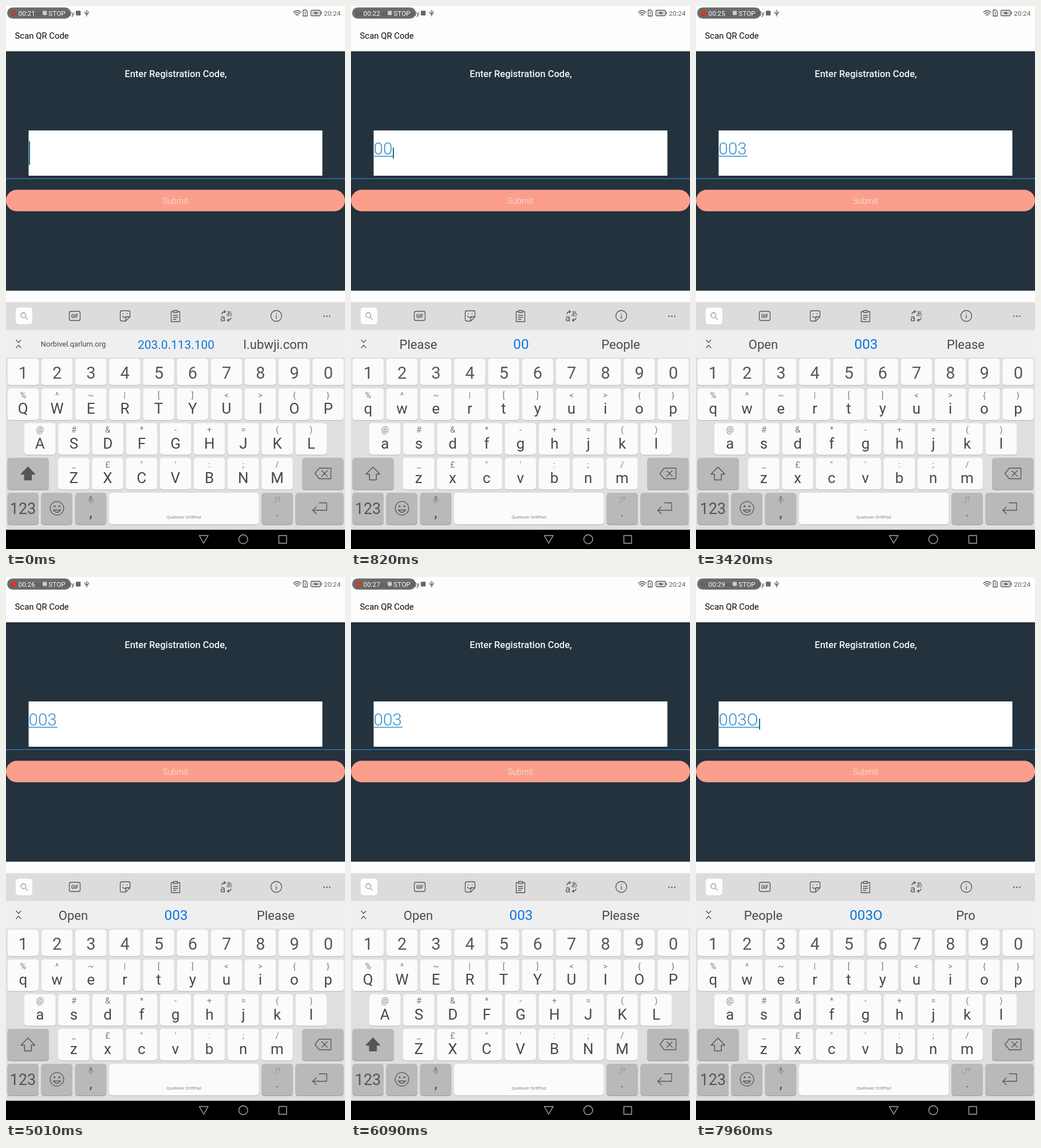
Write an HTML page that moves like this. It is 592x947 px and loops after 8000 ms.

```html
<!DOCTYPE html>
<html lang="en">
<head>
<meta charset="utf-8">
<title>Registration code entry</title>
<style>
  html, body { margin: 0; width: 100%; height: 100%; overflow: hidden; background: #fff; }
  svg { display: block; width: 100%; height: 100%; font-family: Roboto, sans-serif; }
  .mid { text-anchor: middle; }
  .line { fill: none; stroke: #555; stroke-width: 1.3; stroke-linecap: round; stroke-linejoin: round; }
  .key { fill: #fbfbfb; }
  .key-edge { fill: #c0c0c0; }
  .mod { fill: #b9b9b9; }
  .mod-edge { fill: #9c9c9c; }
  .num { font-size: 29px; fill: #585858; }
  .letter { font-size: 26px; fill: #484848; }
  .hint { font-size: 14.8px; fill: #7c7c7c; }
  .side { fill: #484848; }
  .best { fill: #0b76e0; }
  .small { font-size: 11.8px; }
</style>
</head>
<body>
<svg viewBox="0 0 592 947" preserveAspectRatio="none">
  <rect width="592" height="947" fill="#fdfdfd"/>

  <!-- status bar -->
  <g class="small">
    <text x="8" y="16.5" fill="#444">Emergency calls Only</text>
    <rect x="2" y="2.5" width="111" height="19.5" rx="9.7" fill="#565656" opacity=".87"/>
    <rect id="rec" x="9.5" y="8" width="8" height="8" rx="1.5" fill="#e8341c"/>
    <text id="clock" x="21.5" y="16.5" fill="#fff"></text>
    <rect x="64" y="8.5" width="7.3" height="7.3" rx="1" fill="#ccc"/>
    <text x="74.3" y="16.5" fill="#fff">STOP</text>
    <rect x="122" y="8.3" width="8.3" height="8.3" rx="1" fill="#666"/>
    <g class="line" stroke-width="1">
      <path d="M141 7.5v10M138 10v2.5l3 2.5M144 10v2l-3 2.5"/>
    </g>
    <g class="line">
      <path d="M502 11q6.500-6 13 0M504 13.500q4.500-4 9 0M506.500 16q2-2 4 0" />
      <path d="M519 7h4.500l2.500 2.500v8h-7zM522.500 10.500v3M522.500 15.500v.3"/>
      <rect x="532.500" y="7.500" width="16.500" height="9.500" rx="1.5"/>
      <path d="M551 10.500v3.500"/>
    </g>
    <rect x="534" y="9" width="13.5" height="6.500" fill="#d2d2d2"/>
    <path d="M536 12.700l5.500-2.700v1.800h4.500l-5.500 3v-2.100z" fill="#444"/>
    <text x="555" y="16.5" fill="#606060">20:24</text>
  </g>

  <!-- page -->
  <text x="15.500" y="57" font-size="14.9" fill="#0a0a0a">Scan QR Code</text>
  <rect y="79" width="592" height="417.5" fill="#23323d"/>
  <text class="mid" x="296.5" y="124" font-size="16.5" font-weight="500" fill="#f4f6f7">Enter Registration Code,</text>
  <rect x="39.500" y="217" width="513" height="79" fill="#fff"/>
  <rect y="300.500" width="592" height="1.2" fill="#3a83c4"/>
  <rect y="320.500" width="592" height="37.500" rx="18.75" fill="#fb9f8c"/>
  <text class="mid" x="296" y="345" font-size="14.2" font-weight="300" fill="#f5ebe8">Submit</text>
  <text id="value" x="39.500" y="258.500" font-size="29.6" font-weight="300" fill="#2f8fd2"></text>
  <rect id="under" x="40" y="261.300" height="1.5" fill="#2f8fd2"/>
  <rect id="cursor" width="2" fill="#15707c"/>

  <!-- keyboard -->
  <rect y="516.500" width="592" height="48.500" fill="#dcdcdc"/>
  <rect y="565" width="592" height="48" fill="#efefef"/>
  <rect y="613" width="592" height="301" fill="#dfdfdf"/>
  <rect x="17" y="526" width="29" height="29" rx="5" fill="#fdfdfd"/>
  <g class="line">
    <g stroke="#999"><circle cx="30.300" cy="539.300" r="4.300"/><path d="M33.600 542.600l4 4"/></g>
    <rect x="110.500" y="532.500" width="19" height="16" rx="3"/>
    <path d="M202 531.500h12a2.500 2.500 0 0 1 2.500 2.500v8l-7.500 7.500h-7a2.500 2.500 0 0 1-2.500-2.500v-13a2.500 2.500 0 0 1 2.500-2.500zM216.500 542h-5a2.500 2.500 0 0 0-2.500 2.500v5M203.500 541q3.500 4 7 .5M204.500 536.500v.6M211.500 536.500v.6"/>
    <path d="M292 533h-3.500v17.500h15v-17.500h-3.500M292.500 531h7v3.500h-7zM292 539.500h8M292 543h8M292 546.500h5"/>
    <path d="M377 537q1-4 6-4M381 531l2.500 2-2.500 2M393 544q-1 4-6 4M389 546l-2.500 2 2.500 2"/>
    <circle cx="472" cy="540.500" r="9.500"/>
    <path d="M472 539.500v5.500M472 535.800v.4"/>
    <path d="M18 582.500l4 4.500 4-4.500M18 596l4-4.500 4 4.500"/>
  </g>
  <text class="mid" x="120" y="543.700" font-size="8.300" font-weight="700" fill="#555">GIF</text>
  <text x="374" y="549.500" font-size="17" fill="#555">a</text>
  <text x="384" y="541" font-size="11.500" fill="#555" font-family="'Noto Sans CJK JP', 'Noto Sans CJK', sans-serif">あ</text>
  <g fill="#555"><circle cx="555.300" cy="541" r="1.2"/><circle cx="560.300" cy="541" r="1.2"/><circle cx="565.300" cy="541" r="1.2"/></g>

  <text id="left" class="mid side" x="117.500"></text>
  <text id="best" class="mid best" x="297"></text>
  <text id="right" class="mid side" x="471"></text>

  <g id="keys"></g>

  <path id="shift" d="M38.300 804l12 12.500h-6v10h-12v-10h-6z" stroke="#555" stroke-width="1.5" stroke-linejoin="round"/>
  <g class="line" stroke-width="1.5">
    <path d="M547 806h20.500v18.500h-20.500l-7.500-9.250zM551.500 810.500l9.500 9.500M561 810.500l-9.500 9.500"/>
    <path d="M547 866.500h13v13h-24M542 873.500l-6.500 6 6.500 6"/>
    <circle cx="89" cy="876" r="11.800"/>
    <path d="M82.500 879q6.500 8 13 0z"/>
  </g>
  <circle cx="84.800" cy="872.500" r="1.6" fill="#555"/><circle cx="93.200" cy="872.500" r="1.6" fill="#555"/>
  <rect x="145.800" y="854.500" width="4.400" height="8" rx="2.200" fill="#888"/>
  <path d="M143.500 860a4.500 4.500 0 0 0 9 0M148 864.500v3" fill="none" stroke="#888" stroke-width="1.2"/>
  <text class="mid" x="29.500" y="886" font-size="27" fill="#555">123</text>
  <text class="mid letter" x="148" y="891.500">,</text>
  <text class="mid" x="473.500" y="865" font-size="12" fill="#8a8a8a">,!?</text>
  <text class="mid" x="473.500" y="890" font-size="20" fill="#555">.</text>
  <text class="mid" x="310.500" y="893.500" font-size="7" fill="#777" font-family="'Open Sans', sans-serif">Quellover DriftPad</text>

  <!-- navigation -->
  <rect y="913.500" width="592" height="33.500" fill="#000"/>
  <g fill="none" stroke="#a9a9a9" stroke-width="1.4" stroke-linejoin="round">
    <path d="M337.500 923.500h15.500l-7.750 13.500z"/>
    <circle cx="414.300" cy="930" r="7.800"/>
    <rect x="476.500" y="923.500" width="13.500" height="13.500"/>
  </g>

  <circle id="touch" r="11.5" fill="#fff" fill-opacity=".45" stroke="#a4a9ac" stroke-width="1.3"/>
</svg>

<script>
const LOOP = 8000, STEP = 59.2;
const $ = id => document.getElementById(id);
const [rec, clock, value, under, cursor, shift, touch, keys] =
  ["rec", "clock", "value", "under", "cursor", "shift", "touch", "keys"].map($);

function add(tag, attrs, text = "") {
  const el = document.createElementNS("http://www.w3.org/2000/svg", tag);
  for (const name in attrs) el.setAttribute(name, attrs[name]);
  el.textContent = text;
  return keys.appendChild(el);
}

function key(x, y, width, height, kind = "key") {
  const box = { x, width, height, rx: 5 };
  add("rect", { ...box, y: y + 1.3, class: kind + "-edge" });
  add("rect", { ...box, y, class: kind });
}

function label(x, y, kind, text) {
  return add("text", { x, y, class: "mid " + kind }, text);
}

[..."1234567890"].forEach((digit, i) => {
  key(2.5 + i * STEP, 615, 54.5, 46);
  label(30 + i * STEP, 650, "num", digit);
});

const letters = [];
[
  ["QWERTYUIOP", "%^~|[]<>{}", 2.5, 667],
  ["ASDFGHJKL", "@#&*-+=()", 32, 727.5],
  ["ZXCVBNM", "_£\"':;/", 91, 788]
].forEach(([row, hints, left, y]) => [...row].forEach((char, i) => {
  const x = left + i * STEP;
  key(x, y, 54.5, 55);
  label(x + 27.3, y + 16.5, "hint", hints[i]);
  letters.push([label(x + 27.3, y + 44, "letter", char), char]);
}));

key(2.5, 788, 72.5, 55, "mod");
key(517, 788, 72.5, 55, "mod");
for (const x of [2.5, 61.5, 120.7, 446.3]) key(x, 849, 54.5, 55, "mod");
key(505.5, 849, 84, 55, "mod");
key(180, 849, 261.5, 55);

// start, field text, cursor x, suggestions, their sizes
const states = [
  [0, "", 40, ["Norbivel.qarlum.org", "203.0.113.100", "l.ubwji.com"], [12.9, 20.9, 22.2]],
  [205, "0", 56, ["Please", "0", "People"]],
  [645, "00", 73, ["Please", "00", "People"]],
  [1415, "003", 89.7, ["Open", "003", "Please"]],
  [6825, "003O", 110, ["People", "003O", "Pro"]]
];
const ticks = [415, 1415, 2415, 3415, 4415, 5415, 6545, 7415];
const blinks = [[0, 1145], [1415, 2015], [2555, 3015], [3555, 4015], [4545, 5005], [5545, 6015], [6545, 7355], [7885, LOOP]];
const recOn = [[0, 440], [945, 1440], [2015, 2480], [3015, 3480], [4015, 4480], [5005, 5480], [6015, 6545], [7085, 7490]];
// down, up, gone, x, y
const touches = [
  [70, 205, 545, 563, 637],
  [550, 645, 820, 563, 637],
  [1345, 1480, 1755, 152.5, 635],
  [5265, 5345, 5620, 39, 816],
  [6620, 6825, 7085, 505, 698]
];
const within = (spans, t) => spans.some(([a, b]) => t >= a && t < b);

let shown, wasCaps;

function setState(state) {
  const [, text, x, words, sizes = [22, 24.3, 22]] = state;
  value.textContent = text;
  under.setAttribute("width", x - 40);
  cursor.setAttribute("x", x);
  cursor.setAttribute("y", text ? 247 : 236);
  cursor.setAttribute("height", text ? 19 : 41);
  ["left", "best", "right"].forEach((id, i) => {
    const el = $(id);
    el.textContent = words[i];
    el.setAttribute("font-size", sizes[i]);
    el.setAttribute("y", sizes[i] < 15 ? 594 : 598);
  });
}

function setCaps(caps) {
  for (const [el, char] of letters) el.textContent = caps ? char : char.toLowerCase();
  shift.setAttribute("fill", caps ? "#555" : "none");
}

function draw(t) {
  const state = states.filter(s => s[0] <= t).pop();
  if (state !== shown) setState(shown = state);
  const caps = t < 205 || (t >= 5345 && t < 6825);
  if (caps !== wasCaps) setCaps(wasCaps = caps);

  clock.textContent = "00:" + (21 + ticks.filter(at => at <= t).length);
  rec.setAttribute("opacity", within(recOn, t) ? (t < 65 ? 0.5 : 1) : 0);
  cursor.setAttribute("opacity", within(blinks, t) ? 1 : 0);

  const tap = touches.find(([down, , gone]) => t >= down && t < gone);
  touch.setAttribute("opacity", tap ? Math.min(1, (tap[2] - t) / (tap[2] - tap[1])) : 0);
  if (tap) {
    touch.setAttribute("cx", tap[3]);
    touch.setAttribute("cy", tap[4]);
  }
}

const start = performance.now();
function frame() {
  draw((performance.now() - start) % LOOP);
  requestAnimationFrame(frame);
}
frame();
</script>
</body>
</html>
```
